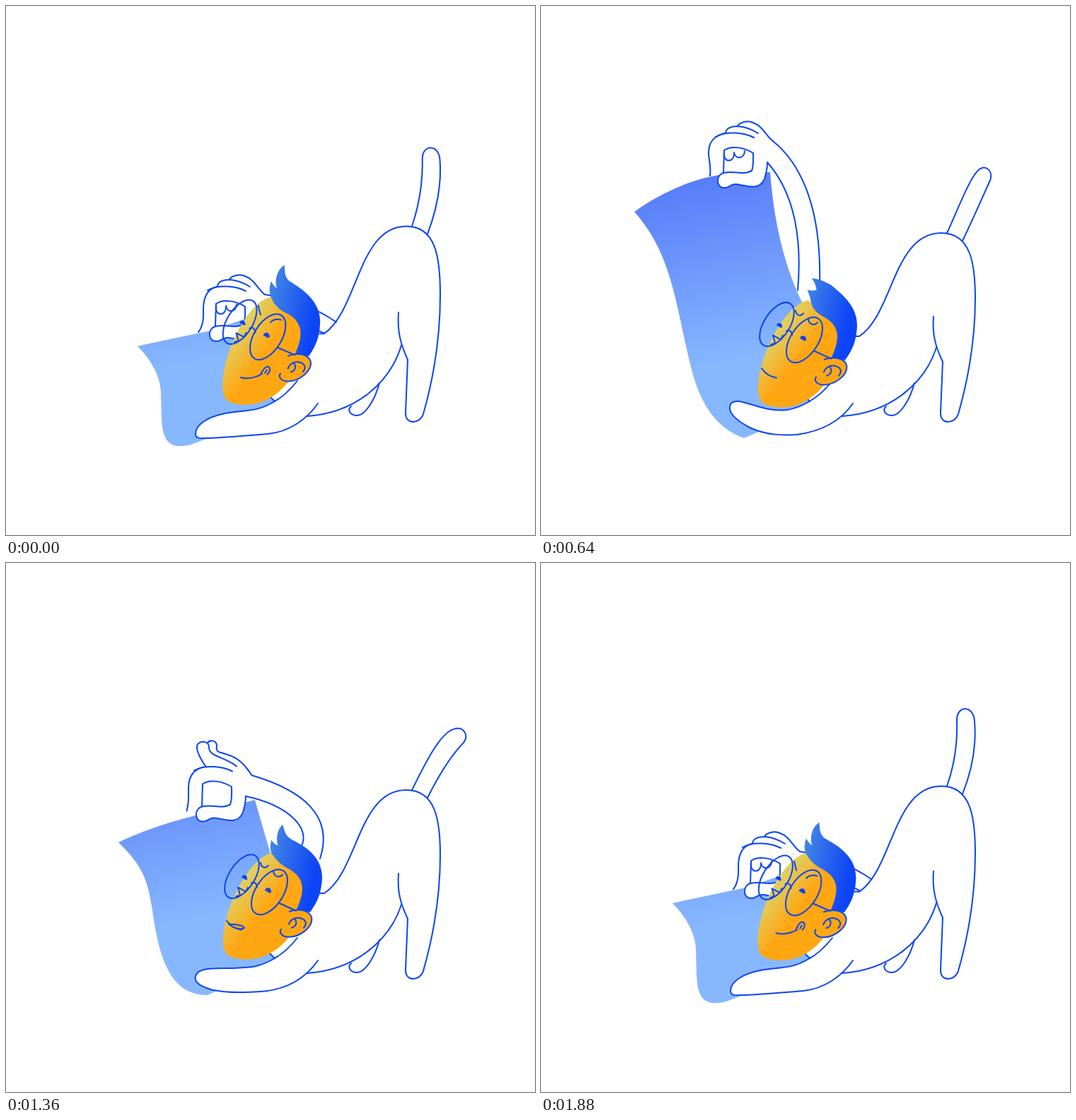
Write an HTML page that moves like this. It is 748 by 748 pixels and loops after 1920 ms.

```html
<!DOCTYPE html>
<html lang="en">
<head>
<meta charset="utf-8">
<title>Playful stretch</title>
<style>
  html, body { margin: 0; width: 100%; height: 100%; overflow: hidden; background: #fff; }
  svg { display: block; width: 100vw; height: 100vh; }
  .line { fill: none; stroke: #0b45f3; stroke-width: 2; stroke-linecap: round; stroke-linejoin: round; }
  .white { fill: #fff; }
  .skin { fill: #ffa712; }
  .ink { fill: #0b45f3; }
</style>
</head>
<body>
<svg viewBox="0 0 748 748">
  <defs>
    <linearGradient id="sheet" gradientUnits="userSpaceOnUse" x1="225" y1="245" x2="282" y2="505">
      <stop offset="0" stop-color="#587df9"/><stop offset="1" stop-color="#87b8ff"/>
    </linearGradient>
    <linearGradient id="face" gradientUnits="userSpaceOnUse" x1="331" y1="451" x2="371" y2="482">
      <stop offset="0" stop-color="#ddd268"/><stop offset="1" stop-color="#ffa712"/>
    </linearGradient>
    <linearGradient id="mane" gradientUnits="userSpaceOnUse" x1="376" y1="405" x2="442" y2="420">
      <stop offset="0" stop-color="#3f82e7"/><stop offset="1" stop-color="#0c44f6"/>
    </linearGradient>
  </defs>

  <path id="tail" class="line"/>
  <path id="armFill" class="white"/>
  <path id="armOuter" class="line"/>
  <path id="armInner" class="line"/>
  <path id="back" class="line"/>
  <path id="leg" class="line"/>
  <path id="belly" class="line"/>
  <path class="line" d="M528 533 C522 556 508 580 495 579 C485 578 483 570 488 566"/>
  <path id="paper" fill="url(#sheet)"/>

  <g id="hand" class="line">
    <path class="white" stroke="none" fill-rule="evenodd" d="M238 240 C242 225 233 207 240 193 C244 184 252 182 260 180 C280 172 305 172 328 191 L320 221 C320 230 318 238 316 244 C309 262 291 254 276 252 C267 251 267 258 259 257 C247 257 247 239 258 236Z M258 236 L259 204 C270 196 289 201 300 208 C300 217 301 225 298 233 C285 240 275 232 258 236Z"/>
    <path id="index" class="white"/>
    <path d="M247 185 C262 176 288 179 301 186"/>
    <path id="middle"/>
    <path id="ring"/>
    <g id="curled">
      <path class="white" d="M259 207 C257 222 273 222 273 209"/>
      <path class="white" d="M273 207 C275 218 288 216 288 205"/>
    </g>
    <path d="M258 236 L259 204 C270 196 289 201 300 208 C300 217 301 225 298 233 C285 240 275 232 258 236 C247 239 247 257 259 257 C267 258 267 251 276 252 C291 254 309 262 316 244 C318 238 320 230 320 221"/>
  </g>

  <path id="frontArm" class="line" style="fill:#fff"/>
  <path class="line" d="M372 551 L380 559"/>

  <g id="head">
    <path fill="url(#face)" d="M378 409 C352 415 326 455 313 497 C306 520 304 545 312 553 C322 562 346 563 363 557 C380 551 394 538 401 528 L420 515 L425 500 C432 460 425 440 405 430 C392 424 384 416 378 409Z"/>
  </g>
  <path id="hair" fill="url(#mane)"/>
  <g id="features" class="line">
    <path class="skin" d="M401 493 C412 489 428 490 432 501 C435 515 415 530 398 529 C389 528 386 522 389 518 L398 506Z" stroke="none"/>
    <path d="M401 493 C412 489 428 490 432 501 C435 515 415 530 398 529 C389 528 386 522 389 518"/>
    <path d="M400 511 C402 504 411 500 418 503 C424 505 426 511 421 516"/>
    <path d="M408 503 C412 508 411 514 404 516"/>
    <ellipse cx="372.5" cy="465.5" rx="19.5" ry="36" transform="rotate(33 372.5 465.5)"/>
    <ellipse cx="333.5" cy="443.5" rx="18" ry="35" transform="rotate(33 333.5 443.5)"/>
    <path d="M347 453 C351 450 355 454 355 459 M386 481 L410 492"/>
    <path d="M325 472 L331 470 L328 459 L339 465 L342 459"/>
    <path class="ink" stroke="none" d="M366 463 C367 458 376 458 375 466 C372 468 370 465 366 463Z M333 445 C334 440 342 440 341 448 C338 449 336 446 333 445Z"/>
    <path id="browL"/>
    <path id="browR"/>
    <path id="mouth"/>
    <path id="lips" class="skin"/>
    <g id="tongue">
      <path class="skin" d="M361 519 C360 512 360 506 364 505 C369 505 370 511 369 515"/>
      <path d="M365 510 L365 515"/>
    </g>
  </g>
</svg>
<script>
const LOOP = 1920, STEP = 40, BEAT = 480;
const $ = id => document.getElementById(id);
const draw = (id, d) => $(id).setAttribute('d', d);
const move = (id, v) => $(id).setAttribute('transform', v);
const show = (id, on) => { $(id).style.display = on ? '' : 'none'; };

// Blend two paths that share the same commands.
function blend(a, b, u) {
  const to = b.match(/-?[\d.]+/g);
  let i = 0;
  return a.replace(/-?[\d.]+/g, n => (+n + (to[i++] - n) * u).toFixed(2));
}

// Poses are sorted by lift: 0 is hand down, 1 is hand up.
const LIFTS = [0, 0.5, 0.83, 1];
function pose(list, p) {
  let i = 0;
  while (i < 2 && p > LIFTS[i + 1]) i++;
  return blend(list[i], list[i + 1], (p - LIFTS[i]) / (LIFTS[i + 1] - LIFTS[i]));
}

const PAPER = [
  'M186 481 C220 474 260 465 290 459 L345 440 C350 450 360 460 370 470 L372 551 L380 559 L283 612 L262 620 C215 632 221 595 219 548 C219 525 205 500 186 481Z',
  'M159 395 C195 378 235 365 272 356 L352 335 C359 360 368 390 378 425 L372 551 L380 559 L300 604 L285 611 C225 612 214 540 206 485 C200 450 195 430 159 395Z',
  'M141 322 C187 293 240 273 272 270 L334 267 C338 325 350 380 375 425 L372 551 L380 559 L305 603 L287 611 C255 600 228 565 215 515 C195 440 190 380 141 322Z',
  'M132 291 C175 260 225 241 262 238 L324 235 C329 300 342 365 372 425 L372 551 L380 559 L308 602 L287 611 C250 598 225 565 212 510 C190 420 185 350 132 291Z'
];
const OUTER = [
  'M366 408 C400 412 440 428 467 447',
  'M347 300 C415 320 465 355 444 418',
  'M335 228 C385 262 416 315 408 395',
  'M328 191 C370 225 397 290 394 395'
];
const INNER = [
  'M356 438 C390 440 430 452 450 463',
  'M340 330 C400 343 430 375 418 400',
  'M326 258 C370 290 390 355 371 418',
  'M320 221 C350 255 371 310 363 402'
];
const FRONT = [
  'M412 530 C400 545 390 554 378 560 C355 574 340 571 310 576 C285 581 268 592 268 605 C268 613 277 611 287 611 C315 610 345 607 371 605 C400 602 425 585 441 562',
  'M412 530 C402 543 392 552 378 560 C355 573 340 573 322 570 C298 566 275 552 268 563 C262 576 280 588 295 596 C320 608 345 607 362 606 C400 601 425 585 441 562'
];
const TAIL = [
  'M574 321 C586 290 589 258 588 230 C588 209 612 209 613 232 C616 268 608 305 596 332',
  'M574 321 C592 285 614 240 634 235 C647 231 656 243 648 254 C628 274 612 300 596 332'
];
const INDEX = [
  'M234 244 C239 238 242 230 241 212 C241 188 252 182 260 180',
  'M239 240 C241 224 236 214 237 206 C238 186 252 182 260 180'
];
const MIDDLE = [
  'M261 180 C261 176 264 173 267 172 C271 170 275 170 279 170 C288 171 298 174 307 180',
  'M264 180 C258 172 250 158 251 150 C253 142 268 142 268 152 C268 166 290 165 307 179'
];
const RING = [
  'M278 170 C279 167 283 165 287 164 C291 163 296 163 300 165 C314 170 318 184 328 191',
  'M266 146 C269 141 279 142 279 150 C278 155 279 158 283 159 C300 164 312 166 328 191'
];
const TUFT = [
  'M374 410 C372 404 372 396 375 389 C377 393 379 396 383 399 C379 386 384 372 394 366 C394 376 394 386 404 391',
  'M382 413 C381 410 379 407 377 404 C381 405 386 404 391 402 C391 397 386 391 380 389 C390 387 400 389 411 395'
];
const BROW_L = ['M360 424 C361 431 367 433 371 428', 'M360 421 C361 426 362 430 363 434'];
const BROW_R = ['M378 436 C379 444 386 446 391 441', 'M377 445 C380 441 387 440 392 442'];
const MOUTH = ['M312 506 C318 514 325 518 333 519', 'M333 522 C346 526 362 521 373 510'];
const LIPS = [
  'M316 511 C322 515 330 518 335 519 C330 519 322 516 316 511Z',
  'M315 511 C322 511 334 512 337 516 C334 519 324 518 315 511Z'
];

const wave = (t, peak, period = BEAT) => Math.cos(2 * Math.PI * (t - peak) / period);
const ramp = (t, a, b) => Math.min(1, Math.max(0, (t - a) / (b - a)));
const smooth = u => u * u * (3 - 2 * u);
const cubic = u => u < 0.5 ? 4 * u ** 3 : 1 - 4 * (1 - u) ** 3;
const pulse = (t, a, b, c, d) => smooth(ramp(t, a, b)) - smooth(ramp(t, c, d));

function drawBody(t) {
  const h = -11 * wave(t, 40);
  const wag = (1 - wave(t, -38, 960)) / 2;
  const y = (base, k = 1) => base + h * k;
  draw('back', `M443 ${y(467, .4)} L450 ${y(467, .4)} C498 ${y(436, .6)} 498 ${y(321)} 566 ${y(321)} C608 ${y(321)} 614 ${y(365)} 614 ${y(413, .5)} C614 475 602 535 590 577 C585 592 564 592 565 575 L568 ${y(503, .3)}`);
  draw('leg', `M555 ${y(439, .6)} C553 ${y(465, .5)} 558 ${y(482, .4)} 568 ${y(503, .3)}`);
  draw('belly', `M559 ${y(483, .35)} C543 533 495 575 426 580`);
  // The tip travels further than the hips.
  let i = 0;
  draw('tail', blend(TAIL[0], TAIL[1], wag).replace(/[\d.]+/g, n => {
    const k = i++;
    if (k % 2 === 0) return n;
    const atBase = k === 1 || k === 19;
    return +n + h * (atBase ? 1 : 1.5);
  }));
}

function drawArm(t) {
  const p = cubic(ramp(t, 0, 490)) - cubic(ramp(t, 1115, 1605));
  const flare = pulse(t, 1120, 1280, 1400, 1540);
  const curl = 1 - smooth(ramp(t, 1120, 1200)) + smooth(ramp(t, 1560, 1800));
  const outer = pose(OUTER, p), inner = pose(INNER, p);
  const n = inner.match(/[\d.]+/g);
  draw('armOuter', outer);
  draw('armInner', inner);
  draw('armFill', `${outer} L${n[6]} ${n[7]} C${n[4]} ${n[5]} ${n[2]} ${n[3]} ${n[0]} ${n[1]}Z`);
  draw('paper', pose(PAPER, p));
  draw('frontArm', blend(FRONT[0], FRONT[1], p));
  move('hand', `translate(${38 * (1 - p)} ${217 * (1 - p)})`);
  draw('index', blend(INDEX[0], INDEX[1], p));
  draw('middle', blend(MIDDLE[0], MIDDLE[1], flare));
  draw('ring', blend(RING[0], RING[1], flare));
  show('curled', curl > 0.05);
  move('curled', `translate(0 ${203 * (1 - curl)}) scale(1 ${curl})`);
}

function drawHead(t) {
  const dy = 3.2 + 4 * wave(t, 120);
  const turn = 0.028 * wave(t, 280);
  const place = `translate(0 ${dy}) rotate(${turn * 180 / Math.PI} 335 560)`;
  move('head', place);
  move('features', place);

  const c = Math.cos(turn), s = Math.sin(turn);
  const at = (x, y) => {
    const a = x - 335, b = y - 560;
    return `${335 + a * c - b * s} ${560 + dy + a * s + b * c} `;
  };
  const tuft = blend(TUFT[0], TUFT[1], (1 + wave(t, 226)) / 2);
  const root = tuft.match(/[\d.]+/g).slice(0, 2).join(' ');
  draw('hair', tuft
    + 'C' + at(430, 404) + at(447, 420) + at(447, 445)
    + 'C' + at(446, 468) + at(440, 480) + at(430, 494)
    + 'L' + at(411, 490)
    + 'C' + at(421, 468) + at(425, 448) + at(402, 434)
    + 'C' + at(388, 427) + at(382, 420) + root + 'Z');

  const smile = 1 - smooth(ramp(t, 400, 520)) + smooth(ramp(t, 1440, 1560));
  const talk = pulse(t, 1200, 1320, 1380, 1460);
  draw('browL', blend(BROW_L[0], BROW_L[1], smile));
  draw('browR', blend(BROW_R[0], BROW_R[1], smile));
  draw('mouth', blend(MOUTH[0], MOUTH[1], smile));
  draw('lips', blend(LIPS[0], LIPS[1], talk));
  show('lips', talk > 0.05);
  show('tongue', smile > 0.9);
  move('tongue', `rotate(${20 - 20 * wave(t, 280)} 364 519)`);
}

function render() {
  const t = Math.floor(performance.now() % LOOP / STEP) * STEP;
  drawBody(t);
  drawArm(t);
  drawHead(t);
  requestAnimationFrame(render);
}
render();
</script>
</body>
</html>
```
